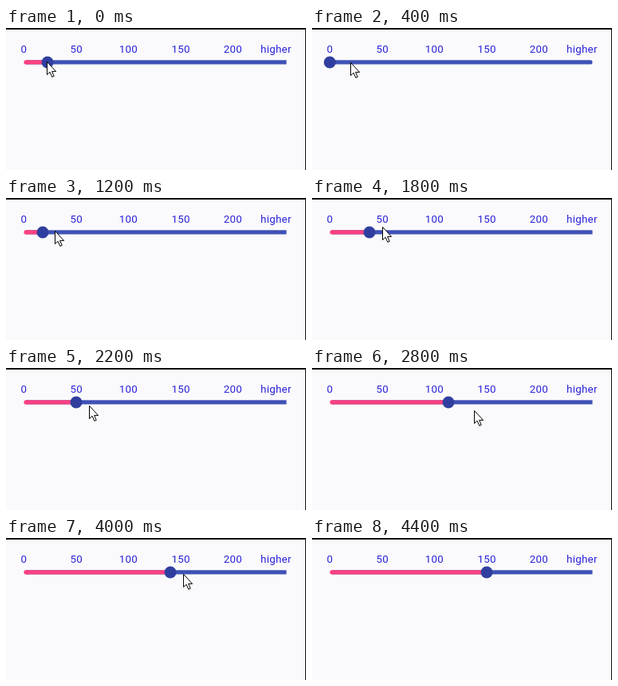
An HTML page for the animation above (5.4 s loop, 376 by 178 pixels).

```html
<!DOCTYPE html>
<html lang="en">
<head>
<meta charset="utf-8">
<title>Range slider</title>
<style>
  html, body { margin: 0; width: 100%; height: 100%; overflow: hidden; background: #fafafc; }
  svg { display: block; width: 376px; height: 178px; }
  text { font: 13.3px Roboto, Arial, sans-serif; letter-spacing: .3px; fill: #2a22d8; text-anchor: middle; }

  /* --x: thumb position, --cx/--cy: pointer tip, --cap: radius of the track end */
  .slider { --x: 52; --cx: 51; --cy: 42; --cap: 0px; animation: drag 5400ms step-end infinite; }
  .track { fill: #3f51b5; }
  .end { rx: var(--cap); }
  .fill { fill: #ff4081; width: calc((var(--x) - 25) * 1px); }
  .cap { fill: #ff4081; }
  .thumb { fill: #303f9f; transform: translate(calc(var(--x) * 1px), 43px); }
  .pointer {
    fill: #fff; stroke: #000; stroke-width: 1;
    transform: translate(calc(var(--cx) * 1px), calc(var(--cy) * 1px));
  }

  @keyframes drag {
    0%     { --x: 52;  --cx: 51;  --cy: 42; --cap: 0px; }
    7.4%   { --x: 22.3; --cx: 48; --cy: 43; --cap: 2.6px; }
    11.11% { --x: 22.3; --cx: 40; --cy: 43; --cap: 2.6px; }
    14.81% { --x: 22.3; --cx: 28; --cy: 41; --cap: 2.6px; }
    18.51% { --x: 23;  --cx: 39;  --cy: 41; --cap: 0px; }
    22.22% { --x: 46;  --cx: 61;  --cy: 41; --cap: 0px; }
    25.92% { --x: 70;  --cx: 85;  --cy: 37; --cap: 0px; }
    33.33% { --x: 72;  --cx: 88;  --cy: 36; --cap: 0px; }
    37.03% { --x: 88;  --cx: 105; --cy: 47; --cap: 0px; }
    40.74% { --x: 88;  --cx: 104; --cy: 47; --cap: 0px; }
    44.44% { --x: 130; --cx: 154; --cy: 46; --cap: 0px; }
    51.85% { --x: 171; --cx: 203; --cy: 53; --cap: 0px; }
    55.55% { --x: 146; --cx: 174; --cy: 57; --cap: 0px; }
    59.25% { --x: 153.3; --cx: 144; --cy: 39; --cap: 0px; }
    66.66% { --x: 165; --cx: 168; --cy: 38; --cap: 0px; }
    70.37% { --x: 185; --cx: 196; --cy: 39; --cap: 0px; }
    74.07% { --x: 206; --cx: 222; --cy: 45; --cap: 0px; }
    77.77% { --x: 222; --cx: 240; --cy: 58; --cap: 0px; }
    81.48%, 100% { --x: 219; --cx: 500; --cy: 58; --cap: 0px; }
  }
</style>
</head>
<body>
<svg viewBox="0 0 376 178">
  <rect width="376" height="2" fill="#111"/>
  <rect x="375" width="1" height="178" fill="#111"/>
  <g>
    <text x="22.5" y="30.7">0</text>
    <text x="88.2" y="30.7">50</text>
    <text x="153.5" y="30.7">100</text>
    <text x="219.2" y="30.7">150</text>
    <text x="284.5" y="30.7">200</text>
    <text x="338.4" y="30.7">higher</text>
  </g>
  <g class="slider">
    <rect class="track end" x="25" y="40.3" width="326.5" height="5.2"/>
    <circle class="cap" cx="25" cy="42.9" r="2.6"/>
    <rect class="fill" x="25" y="40.3" height="5.2"/>
    <circle class="thumb" r="7.5"/>
    <path class="pointer" d="M.5 .5V16.6L4.1 13.2L6.8 19.4L9.2 18.4L6.6 12.4H11.6Z"/>
  </g>
</svg>
</body>
</html>
```
